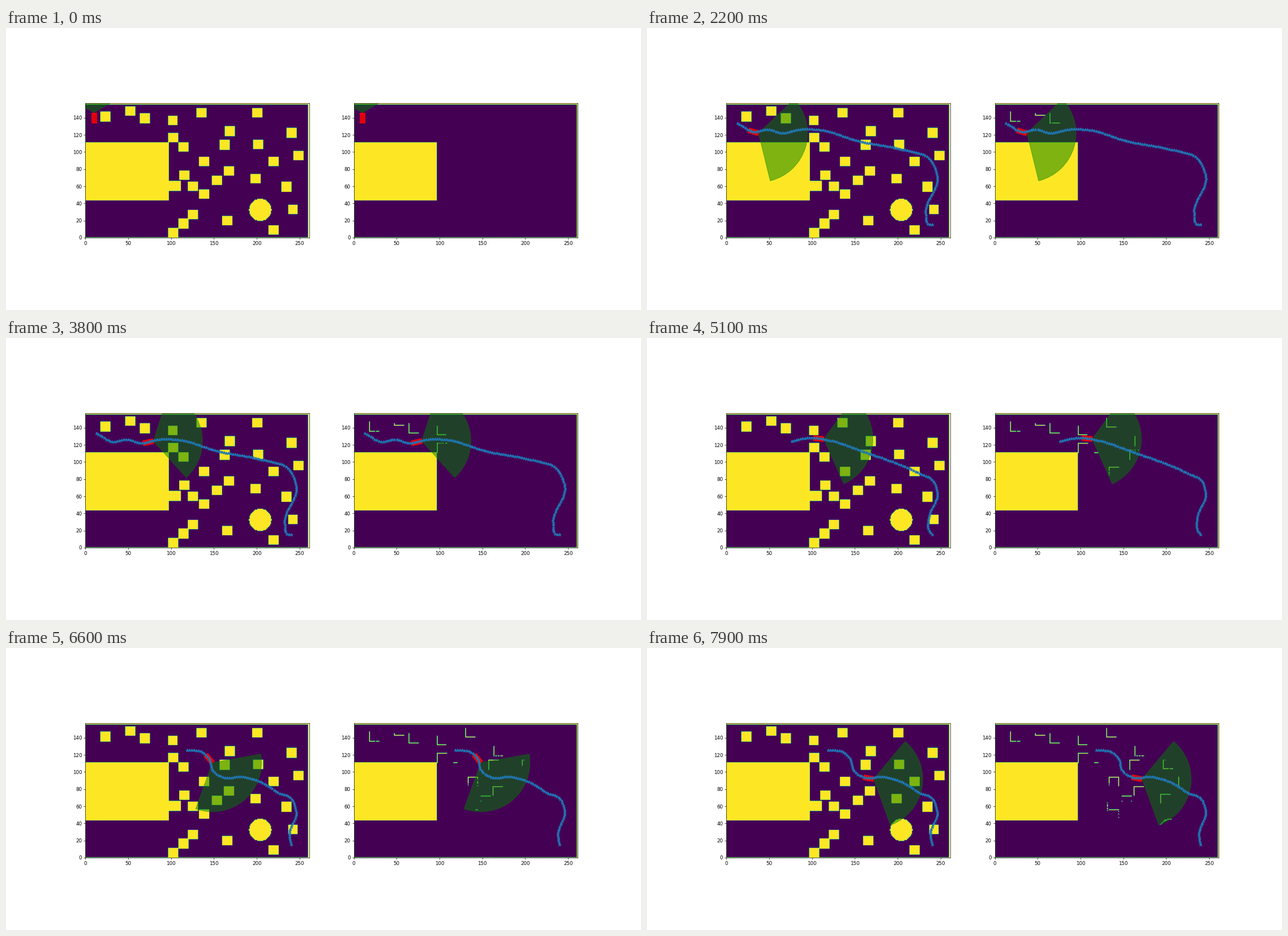
Recreate the animation shown at these times as a matplotlib script. Size 1122 by 499 pixels, loop 8 s.

```python
import numpy as np
import matplotlib.pyplot as plt
from matplotlib.animation import FuncAnimation
from matplotlib.patches import Polygon, Wedge

WIDTH, HEIGHT, DPI = 1122, 499, 1122 / 18
FRAMES, INTERVAL = 80, 100
COLS, ROWS = 261, 157
SPEED = 2.66          # distance driven per frame
REACH, HALF_FOV = 57.3, 60
CAR_LEN, CAR_WID = 12, 6
HALF_BOX = 5.9

BOXES = [
    (23.5, 141.5), (52.5, 148), (69.5, 139.5), (102, 137), (102.5, 117),
    (114.5, 106), (138.5, 89), (115.5, 73), (105.5, 60.5), (102.5, 60.5),
    (125.5, 60), (138.5, 51), (153.5, 67), (167.5, 78), (162.5, 108.5),
    (168.5, 124.5), (135.5, 146), (200.5, 146), (201.5, 109), (240.5, 122.5),
    (248.5, 96), (219.5, 89), (198.5, 69), (234.5, 59.5), (242, 33),
    (219.5, 9), (165.5, 20), (125.5, 27), (114.5, 16.5), (102.5, 5.5)]
DISC = (204, 32.5, 13.05)

# Key points of each planned route, by the frame on which it appears
GOAL = (240, 15)
SLOPE = [(157, 113), (224, 87), (242, 77), (246, 63)]
ROUTES = {
    1: [(10, 140), (14, 129), (60, 124), (120, 119), (230, 70), (247, 33),
        (242, 10), GOAL],
    10: [(13, 132.5), (8, 133.5), (15, 134.3), (29, 123.5), (47, 126.2),
         (67, 123.3), (83, 127), (110, 126.8), (135, 122), *SLOPE,
         (238.7, 26), GOAL],
    14: [(13, 133.4), (32, 123.6), (47, 126), (67, 122), (84, 126),
         (105, 126.2), (158, 111.6), (201, 103.7), (238, 90.5), (246, 72),
         (232.5, 28), (235.6, 15.4), GOAL],
    39: [(76.2, 124.2), (95, 128), (122, 124.8), *SLOPE, (236.5, 36),
         (236, 21), GOAL],
    55: [(118.5, 125.5), (136, 123.2), (144, 116), (149, 101), (163, 93.1),
         (180, 94.4), (205, 88), (226, 75.3), (239, 70), (246, 54),
         (238, 27), GOAL],
}

# Turning on the spot before the drive
DRIVE_START = 14
TURN_AT = [0, 6, 7, 11, DRIVE_START]
TURN_POSE = [(10, 10, 10, 10, 13),
             (140, 136.7, 136.2, 134.6, 133.4),
             (90, -20, -75, -161, -22)]


def smooth(points):
    """Cubic Hermite curve through the points, with its arc length."""
    p = np.array(points, float)
    knots = np.r_[0, np.cumsum(np.hypot(*np.diff(p, axis=0).T))]
    slopes = np.gradient(p, knots, axis=0)
    t = np.linspace(0, knots[-1], 800)
    k = np.clip(np.searchsorted(knots, t, "right") - 1, 0, len(p) - 2)
    h = (knots[k + 1] - knots[k])[:, None]
    u = (t - knots[k])[:, None] / h
    ease = u * u * (3 - 2 * u)
    curve = (p[k] + ease * (p[k + 1] - p[k])
             + h * u * (1 - u) * ((1 - u) * slopes[k] - u * slopes[k + 1]))
    arc = np.r_[0, np.cumsum(np.hypot(*np.diff(curve, axis=0).T))]
    return curve, arc


def at(route, s):
    curve, arc = route
    return np.array([np.interp(s, arc, axis) for axis in curve.T])


def markers(route):
    total = route[1][-1]
    return at(route, np.linspace(0, total, round(total / SPEED) + 1))


CURVES = {start: smooth(points) for start, points in ROUTES.items()}
MARKERS = {start: markers(route) for start, route in CURVES.items()}


def current(i):
    return max((s for s in ROUTES if s <= i), default=None)


def pose(i):
    if i < DRIVE_START:
        return tuple(np.interp(i, TURN_AT, keys) for keys in TURN_POSE)
    start = current(i)
    route, s = CURVES[start], (i - start) * SPEED
    x, y = at(route, s)
    # The heading lags a little behind the curve
    dx, dy = at(route, max(s, 1)) - at(route, max(s - 5, 0))
    return x, y, np.degrees(np.arctan2(dy, dx))


def nose(x, y, heading):
    a = np.radians(heading)
    return x + CAR_LEN / 2 * np.cos(a), y + CAR_LEN / 2 * np.sin(a)


def car_corners(x, y, heading):
    a = np.radians(heading)
    rot = np.array([[np.cos(a), -np.sin(a)], [np.sin(a), np.cos(a)]])
    box = np.array([(-1, -1), (1, -1), (1, 1), (-1, 1)]) / 2
    return box * (CAR_LEN, CAR_WID) @ rot.T + (x, y)


def base_map(block_width):
    grid = np.zeros((ROWS, COLS))
    grid[[0, -1]] = 1
    grid[:, [0, -1]] = 1
    grid[44:112, :block_width] = 1
    return grid


def full_map():
    grid = base_map(98)
    yy, xx = np.mgrid[:ROWS, :COLS]
    for x, y in BOXES:
        grid[np.maximum(abs(xx - x), abs(yy - y)) < HALF_BOX] = 1
    x, y, r = DISC
    grid[np.hypot(xx - x, yy - y) < r] = 1
    return grid


def first_seen(world):
    """Frame on which a scan ray first hits each cell."""
    seen = np.full(world.shape, FRAMES)
    dist = np.arange(0.5, REACH, 0.25)
    for i in range(FRAMES):
        x, y, heading = pose(i)
        ax, ay = nose(x, y, heading)
        ang = np.radians(heading + np.arange(-HALF_FOV, HALF_FOV + 1))[:, None]
        cx = np.clip(np.rint(ax + dist * np.cos(ang)), 0, COLS - 1).astype(int)
        cy = np.clip(np.rint(ay + dist * np.sin(ang)), 0, ROWS - 1).astype(int)
        blocked = world[cy, cx] > 0
        rays = np.flatnonzero(blocked.any(axis=1))
        hit = blocked.argmax(axis=1)[rays]
        rows, cols = cy[rays, hit], cx[rays, hit]
        seen[rows, cols] = np.minimum(seen[rows, cols], i)
    return seen


WORLD, KNOWN = full_map(), base_map(97)
SEEN = first_seen(WORLD)

fig, axes = plt.subplots(
    1, 2, figsize=((WIDTH + 1e-6) / DPI, (HEIGHT + 1e-6) / DPI), dpi=DPI)


def make_panel(ax, grid):
    image = ax.imshow(grid, origin="lower", vmin=0, vmax=1)
    ax.set_xlim(0, COLS)
    ax.set_ylim(0, ROWS)
    view = ax.add_patch(Wedge((0, 0), REACH, 0, 1, color="green", alpha=0.5))
    car = ax.add_patch(Polygon(car_corners(0, 0, 0), color="red", alpha=0.85))
    line, = ax.plot([], [], "*", color="tab:blue")
    return image, view, car, line


panels = [make_panel(ax, grid) for ax, grid in zip(axes, (WORLD, KNOWN))]


def draw(i):
    x, y, heading = pose(i)
    start = current(i)
    for _, view, car, line in panels:
        view.set_center(nose(x, y, heading))
        view.set_theta1(heading - HALF_FOV)
        view.set_theta2(heading + HALF_FOV)
        car.set_xy(car_corners(x, y, heading))
        line.set_data(*(MARKERS[start] if start else ([], [])))
    panels[1][0].set_data(np.maximum(KNOWN, SEEN <= i))
    return [artist for panel in panels for artist in panel]


anim = FuncAnimation(fig, draw, frames=FRAMES, interval=INTERVAL,
                     init_func=lambda: draw(0), repeat=True, repeat_delay=0)
plt.show()
```
